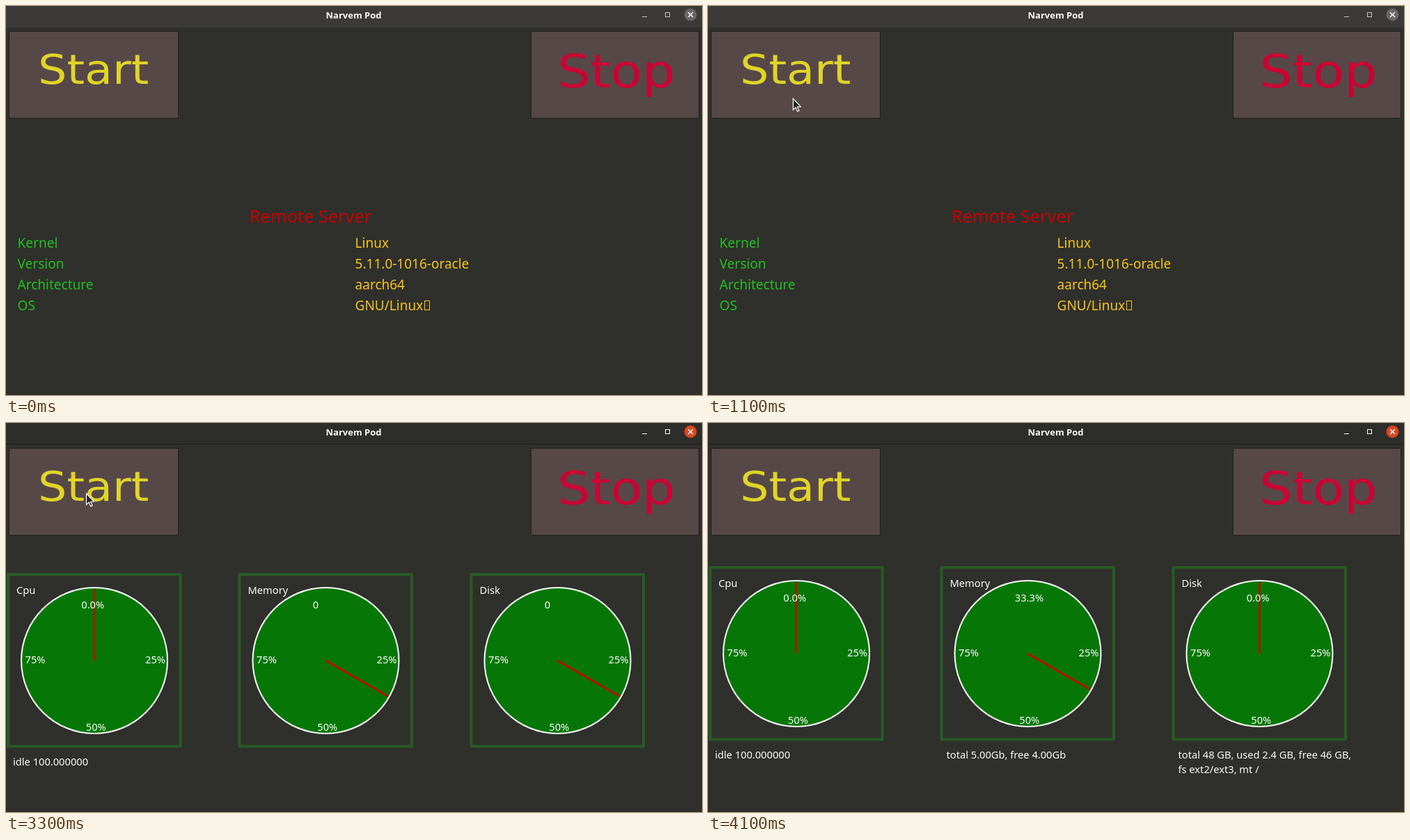
An HTML page with a canvas for the animation above (8 s loop, 1000 by 560 pixels).

```html
<!DOCTYPE html>
<html lang="en">
<head>
<meta charset="utf-8">
<title>Narvem Pod</title>
<style>
  html, body { margin: 0; width: 100%; height: 100%; overflow: hidden; background: #2f302c; }
  canvas { display: block; width: 100%; height: 100%; }
</style>
</head>
<body>
<canvas id="stage" width="1000" height="560"></canvas>
<script>
const ctx = document.getElementById('stage').getContext('2d');
const LOOP = 8000;
const SANS = '"Noto Sans", "Open Sans", sans-serif';
const WHITE = '#fafafa', RED = '#c80202', GREEN = '#22c022', YELLOW = '#f7c51e';

// Button faces are pictures shown wider than their natural shape
const FACE_ASPECT = 1.125;

// Moments at which the window reacts
const CONNECTED = 2100, CPU_READY = 3300, MEMORY_READY = 3700, DISK_READY = 4100;

const INFO = [
  ['Kernel', 'Linux'],
  ['Version', '5.11.0-1016-oracle'],
  ['Architecture', 'aarch64'],
  ['OS', 'GNU/Linux'],
];

const GAUGES = [
  { name: 'Cpu', x: 0, ready: CPU_READY, value: 0, details: ['idle 100.000000'] },
  { name: 'Memory', x: 332.5, ready: MEMORY_READY, value: 33.3,
    details: ['total 5.00Gb, free 4.00Gb'] },
  { name: 'Disk', x: 665.5, ready: DISK_READY, value: 0,
    details: ['total 48 GB, used 2.4 GB, free 46 GB,', 'fs ext2/ext3, mt /'] },
];

function text(str, x, y, size, color, family = SANS, weight = 400, align = 'left') {
  ctx.font = `${weight} ${size}px ${family}`;
  ctx.fillStyle = color;
  ctx.textAlign = align;
  ctx.fillText(str, x, y);
}

function line(x1, y1, x2, y2, color, width) {
  ctx.strokeStyle = color;
  ctx.lineWidth = width;
  ctx.beginPath();
  ctx.moveTo(x1, y1);
  ctx.lineTo(x2, y2);
  ctx.stroke();
}

function circle(x, y, r, color) {
  ctx.fillStyle = color;
  ctx.beginPath();
  ctx.arc(x, y, r, 0, 2 * Math.PI);
  ctx.fill();
}

function titleBar(focused) {
  const icon = focused ? '#ffffff' : '#c9c8c5';
  ctx.fillStyle = focused ? '#2d2e2a' : '#3b3a38';
  ctx.fillRect(0, 0, 1000, 31);
  if (focused) line(0, 30.5, 1000, 30.5, '#1b1b19', 1);
  text('Narvem Pod', 499.5, 18, 13, WHITE, '"Open Sans", sans-serif', 700, 'center');
  line(914, 15.5, 921, 15.5, icon, 1);
  ctx.strokeRect(947.5, 9.5, 6, 6);
  circle(983.5, 12.5, 9, focused ? '#dc4520' : '#686764');
  line(980, 9, 987, 16, '#ffffff', 1.5);
  line(987, 9, 980, 16, '#ffffff', 1.5);
}

function button(x, width, label, labelX, baseline, size, color) {
  ctx.fillStyle = '#574848';
  ctx.fillRect(x, 37, width, 124);
  ctx.strokeStyle = '#20201d';
  ctx.lineWidth = 1;
  ctx.strokeRect(x - 0.5, 36.5, width + 1, 125);
  ctx.save();
  ctx.translate(labelX, baseline);
  ctx.scale(FACE_ASPECT, 1);
  text(label, 0, 0, size, color, '"DejaVu Sans", sans-serif');
  ctx.restore();
}

function serverInfo() {
  text('Remote Server', 350, 312, 25.3, RED);
  INFO.forEach(([key, value], row) => {
    const y = 348 + 30 * row;
    text(key, 16.6, y, 19, GREEN);
    text(value, 501.6, y, 19, YELLOW);
  });
  // Missing-glyph box after the last value
  ctx.strokeStyle = YELLOW;
  ctx.lineWidth = 1;
  ctx.strokeRect(601.5, 424.5, 7, 13);
}

function gauge({ name, x, ready, value, details }, t) {
  const known = t >= ready;
  const label = (str, dx, y) => text(str, dx, y, 14.67, WHITE);
  ctx.save();
  ctx.translate(x, t >= DISK_READY ? -10 : 0);

  ctx.strokeStyle = '#285a26';
  ctx.lineWidth = 4;
  ctx.lineJoin = 'round';
  ctx.strokeRect(3, 218, 247.5, 247.5);
  circle(127, 342, 106, WHITE);
  circle(127, 342, 104, '#067706');

  const angle = (known ? value : 33.3) / 100 * 2 * Math.PI;
  line(127, 342, 127 + 103 * Math.sin(angle), 342 - 103 * Math.cos(angle), RED, 2.6);

  label(name, 15, 246);
  label(known ? value.toFixed(1) + '%' : '0', 108.3, 267);
  label('25%', 200, 346);
  label('50%', 114.8, 443);
  label('75%', 27.5, 346);
  if (known) details.forEach((str, row) => label(str, 10, 493 + 20.5 * row));
  ctx.restore();
}

// The pointer glides in to the Start button, rests, then drops out of the window.
function pointerAt(t) {
  const step = Math.floor(t / 100) * 100;
  if (step < 600 || step >= 3700) return null;
  if (step < CPU_READY) {
    const left = Math.max(0, 1300 - step) / 700;
    const eased = left ** 1.76;
    return [115 + 62 * eased, 87 + 416 * eased];
  }
  const u = (step - 3200) / 100;
  return [115 + 8 * (u - 1), 87 + 14 * u ** 2.3];
}

function pointer([x, y]) {
  const shape = [[0, 0], [0, 16], [3.7, 12.6], [6.2, 18.4], [8.6, 17.4], [6.1, 11.7], [10.8, 11.5]];
  ctx.beginPath();
  shape.forEach(([dx, dy]) => ctx.lineTo(x + 0.5 + dx, y + 0.5 + dy));
  ctx.closePath();
  ctx.fillStyle = '#242424';
  ctx.fill();
  ctx.strokeStyle = '#ffffff';
  ctx.lineWidth = 1.2;
  ctx.lineJoin = 'miter';
  ctx.stroke();
}

function draw() {
  const t = performance.now() % LOOP;
  const connected = t >= CONNECTED;
  ctx.fillStyle = '#2f302c';
  ctx.fillRect(0, 0, 1000, 560);
  titleBar(connected);
  button(5, 242, 'Start', 46, 112, 58, '#e0d428');
  button(755, 240, 'Stop', 792.5, 117, 66, '#cc0033');
  if (connected) GAUGES.forEach(item => gauge(item, t));
  else serverInfo();
  const position = pointerAt(t);
  if (position) pointer(position);
  requestAnimationFrame(draw);
}
draw();
</script>
</body>
</html>
```
